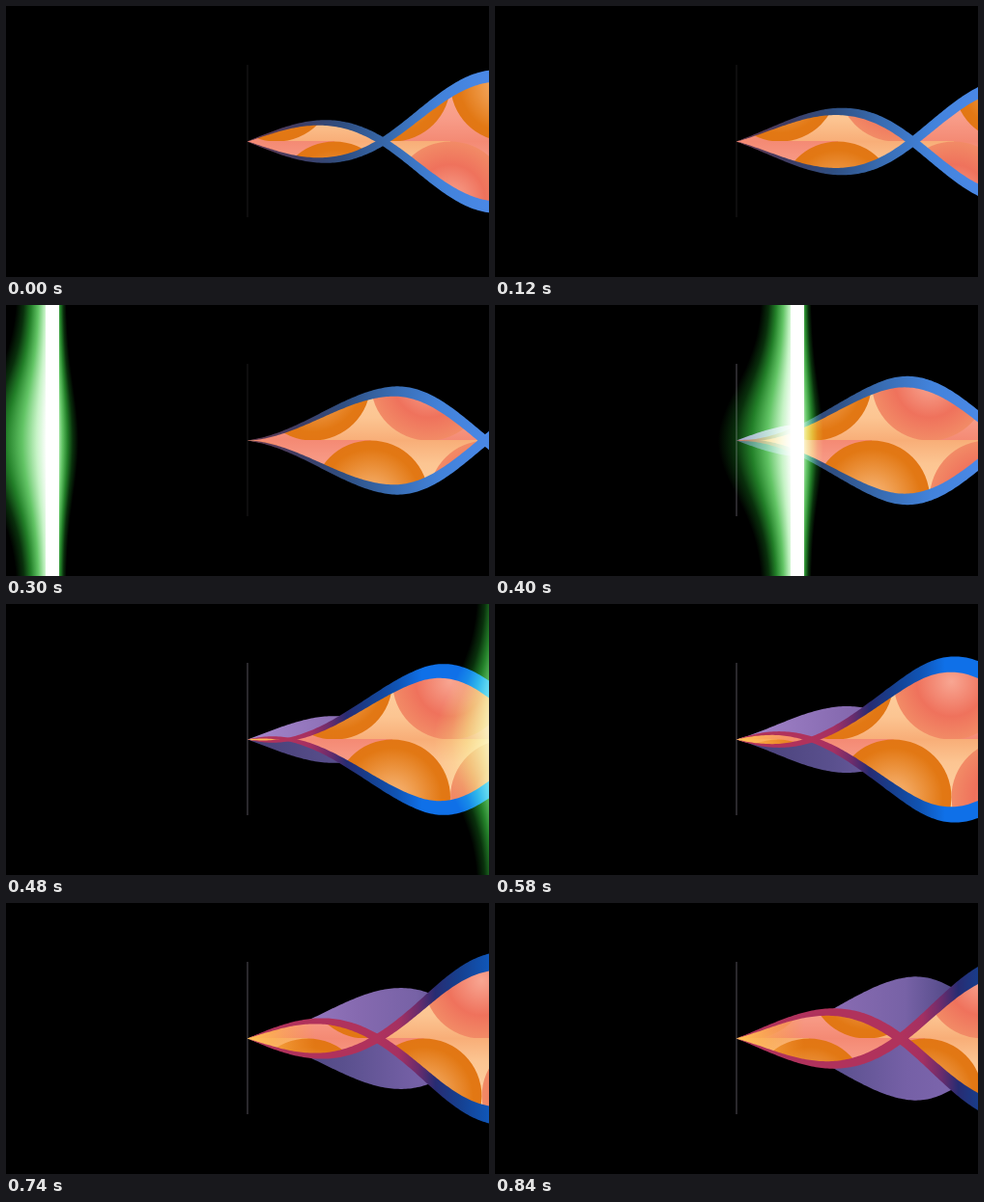
Animation of 500x281 px, one loop 0.86 s. Source, as an HTML page with a canvas:

```html
<!DOCTYPE html>
<html lang="en">
<head>
<meta charset="utf-8">
<title>Wave and beam</title>
<style>
  html, body { margin: 0; width: 100%; height: 100%; overflow: hidden; background: #000; }
  canvas { display: block; width: 100vw; height: 100vh; }
</style>
</head>
<body>
<canvas id="stage" width="500" height="281"></canvas>
<script>
const ctx = document.getElementById('stage').getContext('2d');
const W = 500, H = 281, LOOP = 860, STEP = 20;
const X0 = 250, MID = 140.5, HALF = 267, R = 60;

const crossing = t => 140 + 0.353 * t;
const patternX = t => 340 + 0.125 * t;
const beamX = t => 48 + 2.65 * (t - 300);

// Height grows with distance and levels off beyond the knee
const FLAT = { knee: 150, bend: 159 }, TALL = { knee: 180, bend: 140 };
const envelope = (u, { knee, bend }) => 0.375 * (u - Math.max(0, u - knee) ** 2 / bend);
const wave = (u, c, shape) => envelope(u, shape) * Math.sin(Math.PI * (c - u) / HALF);

function paint(grad, stops) {
  stops.forEach(([at, color]) => grad.addColorStop(at, color));
  return grad;
}
const across = (x1, x2, stops) => paint(ctx.createLinearGradient(x1, 0, x2, 0), stops);
const down = (y1, y2, stops) => paint(ctx.createLinearGradient(0, y1, 0, y2), stops);

function clipX(from, to, draw) {
  if (to <= from) return;
  ctx.save();
  ctx.beginPath();
  ctx.rect(from, 0, to - from, H);
  ctx.clip();
  draw();
  ctx.restore();
}

function wavePath(c, shape, dirs) {
  ctx.beginPath();
  for (const dir of dirs) {
    ctx.moveTo(X0, MID);
    for (let u = 0; u <= 252; u += 2) ctx.lineTo(X0 + u, MID + dir * wave(u, c, shape));
    ctx.lineTo(X0 + 252, MID);
    ctx.closePath();
  }
}

function ribbons(c, shape, depth, fill) {
  ctx.fillStyle = fill;
  for (const dir of [1, -1]) {
    const near = [], far = [];
    for (let u = 0; u <= 252; u += 2) {
      const y = MID + dir * wave(u, c, shape), k = depth(u) / 2;
      near.push([X0 + u, y + k]);
      far.unshift([X0 + u, y - k]);
    }
    ctx.beginPath();
    near.concat(far).forEach(p => ctx.lineTo(...p));
    ctx.fill();
  }
}

const ORANGE = [[0, '#fabb80'], [0.5, '#ec9440'], [0.85, '#e27814'], [1, '#e27614']];
const PINK = [[0, '#f8a692'], [0.6, '#ef725c'], [1, '#f28b66']];
const PEACH_STAR = [[0, '#fdd0a0'], [0.6, '#fcc592'], [1, '#f8ae78']];
const PINK_STAR = [[0, '#faae94'], [0.6, '#f89c88'], [1, '#f48a74']];

// Two rows of touching discs, with the gaps between them as curved stars
function pattern(s, lobe) {
  for (const dir of [-1, 1]) {
    const cy = MID + dir * R;
    const discX = i => s + 2 * R * i - (dir < 0 ? R : 0);
    for (let i = -2; i < 4; i++) {
      ctx.fillStyle = down(cy, MID, i % 2 ? PINK_STAR : PEACH_STAR);
      ctx.fillRect(discX(i), dir < 0 ? MID - 100 : MID - 0.5, 2 * R + 0.5, 100.5);
    }
    for (let i = -2; i < 4; i++) {
      const x = discX(i);
      let pink = i % 2 !== 0;
      if (lobe === 'lead' && dir < 0) pink = false;
      if (lobe === 'tail' && dir > 0) pink = !pink;
      ctx.fillStyle = paint(ctx.createRadialGradient(x, cy, 0, x, cy, R), pink ? PINK : ORANGE);
      ctx.beginPath();
      ctx.arc(x, cy, R, 0, 7);
      ctx.fill();
    }
  }
  if (lobe === 'tail') {
    ctx.fillStyle = across(X0, X0 + 70, [[0, '#ffc455'], [0.35, '#fdb350c0'], [1, '#f8a04000']]);
    ctx.fillRect(X0, 0, 70, H);
  }
}

function filling(t, shape) {
  const c = crossing(t), s = patternX(t);
  const a = Math.max(X0, X0 + c - HALF), b = Math.min(W, X0 + c);
  ctx.save();
  wavePath(c, shape, [-1, 1]);
  ctx.clip();
  clipX(X0, a, () => pattern(s, 'tail'));
  clipX(a, b, () => pattern(s, 'main'));
  clipX(b, W, () => pattern(s, 'lead'));
  ctx.restore();
}

function axis(color) {
  ctx.fillStyle = color;
  ctx.fillRect(249.5, 61, 1, 158);
}

function before(t) {
  axis('#1c1a1c');
  filling(t, FLAT);
  const blue = across(X0, W, [[0, '#6a3a50'], [0.2, '#403c62'], [0.4, '#2f4f82'],
    [0.6, '#386cb2'], [0.8, '#4282da'], [1, '#4a88e6']]);
  ribbons(crossing(t), FLAT, u => 0.17 * envelope(u, FLAT) + Math.min(0.6, u / 15), blue);
}

function after(t) {
  const c = crossing(t), node = X0 + c - HALF, lag = c - 151;
  axis('#545058');
  // The purple wave trails the ribbons
  const upper = across(X0, W, [[0, '#a586cc'], [0.45, '#866ab0'], [0.7, '#7762a6'], [0.9, '#504886']]);
  const lower = across(X0, W, [[0, '#463f76'], [0.4, '#5a508e'], [0.7, '#7560a6'], [1, '#8068b0']]);
  clipX(X0, Math.min(W, X0 + lag), () => {
    for (const [dir, fill] of [[-1, upper], [1, lower]]) {
      wavePath(lag, TALL, [dir]);
      ctx.fillStyle = fill;
      ctx.fill();
    }
  });
  filling(t, TALL);
  const shade = across(node, node + 150, [[0, '#b0325c'], [0.15, '#a43062'], [0.28, '#6c2c6c'],
    [0.4, '#282c72'], [0.56, '#163f8e'], [0.75, '#1054b4'], [0.92, '#0f70e8'], [1, '#0f70e8']]);
  ribbons(c, TALL, u => 0.068 * u + Math.min(1, u / 25), shade);
}

function beam(x) {
  if (x < -40 || x > W + 90) return;
  const left = [[0, '#000000'], [0.22, '#09300c'], [0.42, '#238029'], [0.62, '#62c465'],
    [0.8, '#c6f3c6'], [0.93, '#ffffff'], [1, '#ffffff']];
  const right = left.map(([at, color]) => [1 - at, color]);
  ctx.globalCompositeOperation = 'screen';
  for (let y = 0; y < H; y++) {
    const bell = Math.exp(-(((y - MID) / 78) ** 2));
    const l = 36 + 46 * bell, r = 14 + 13 * bell;
    ctx.fillStyle = across(x - l, x, left);
    ctx.fillRect(x - l, y, l, 1);
    ctx.fillStyle = across(x, x + r, right);
    ctx.fillRect(x, y, r, 1);
  }
  ctx.globalCompositeOperation = 'source-over';
  ctx.fillStyle = '#fff';
  ctx.fillRect(x - 7, 0, 14, H);
}

const start = performance.now();

function frame() {
  const t = Math.floor((performance.now() - start) % LOOP / STEP) * STEP;
  const x = beamX(t), edge = Math.min(W, Math.max(0, x));
  ctx.fillStyle = '#000';
  ctx.fillRect(0, 0, W, H);
  clipX(edge, W, () => before(t));
  clipX(0, edge, () => after(t));
  beam(x);
  requestAnimationFrame(frame);
}
frame();
</script>
</body>
</html>
```
